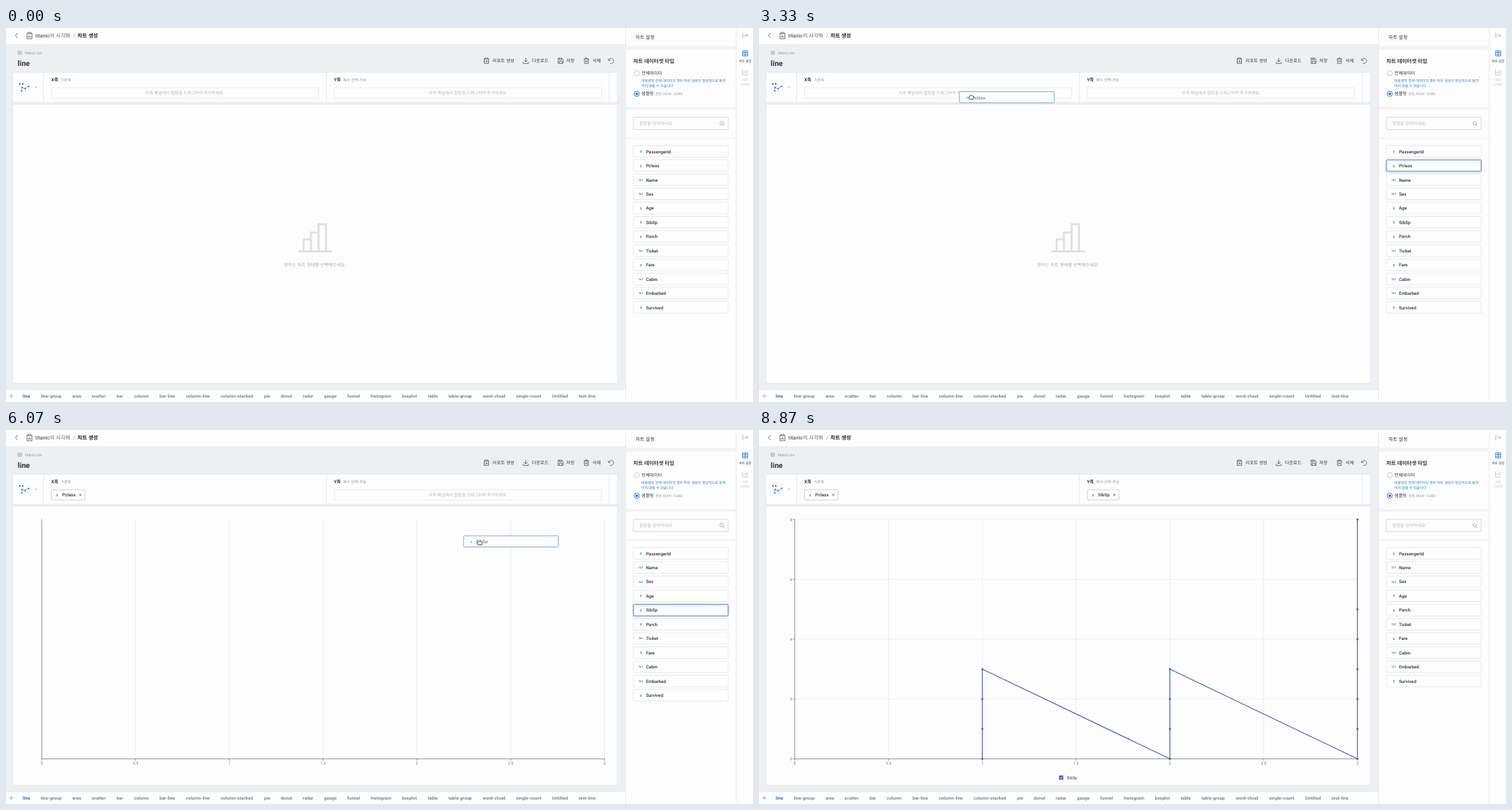
Animation, 1024 px wide and 513 px high, one loop 9.91 s. Source, as an HTML page:

```html
<!DOCTYPE html>
<html lang="ko">
<head>
<meta charset="utf-8">
<title>차트 생성</title>
<style>
html, body { margin: 0; width: 100%; height: 100%; overflow: hidden; background: #fdfdfe; }
svg { display: block; width: 100%; height: 100%; }
text {
  font: 400 6.14px Roboto, "Noto Sans CJK KR", "Noto Sans CJK", sans-serif;
  fill: #333538; text-rendering: geometricPrecision; white-space: pre;
}
.mid { text-anchor: middle; }
.end { text-anchor: end; }
.b { font-weight: 700; }
.m { font-weight: 500; }
.s4 { font-size: 4.35px; }
.s48 { font-size: 4.85px; }
.s5 { font-size: 5.12px; }
.s7 { font-size: 7.15px; }
.hint { font-size: 5.77px; fill: #b4b7bc; }
.grey { fill: #8f9399; }
.pale { fill: #b9bcc1; }
.blue { fill: #1b78d0; }
.tab { font-weight: 700; fill: #85898f; }
.tab.on { fill: #1b78d0; }
.ico { fill: none; stroke: #55585d; stroke-width: .8; }
.box { fill: #fdfdfe; stroke: #e3e5e8; stroke-width: .8; }
.rule { stroke: #e6e8eb; stroke-width: .9; }
.hot { fill: none; stroke: #4a92d6; stroke-width: 1; filter: drop-shadow(0 1.5px 1.5px #0003); }
.grid { stroke: #e2e7ec; stroke-width: .7; fill: none; }
.axis { stroke: #73767d; stroke-width: .8; fill: none; }
.tick { font-size: 5.12px; fill: #6e7079; }
.line { fill: none; stroke: #4a69b8; stroke-width: 1.15; stroke-linejoin: bevel; }
.dot { fill: #4a69b8; transform-box: fill-box; transform-origin: center; }
.skin { fill: #fff; stroke: #222; stroke-width: .8; stroke-linejoin: round; }

/* loop: 9910 ms, 1% = 99.1 ms */
.step { animation: 9.91s step-end infinite; }
.before-x { animation-name: before-x; }
.after-x { animation-name: after-x; }
.before-y { animation-name: before-y; }
.after-y { animation-name: after-y; }
.before-plot { animation-name: before-plot; }
.after-plot { animation-name: after-plot; }
.result { animation-name: result; }
.rows { animation-name: rows; }
.drag-x { animation-name: drag-x; }
.drag-y { animation-name: drag-y; }
.arrow { animation-name: arrow; }
.fist { animation-name: fist; }
.up1 { animation-name: up1; }
.up2 { animation-name: up2; }
.hover { animation-name: hover; }
.pointer { animation: pointer 9.91s linear infinite; }
.reveal { width: 0; animation: reveal 9.91s linear infinite; }
.dot { animation: pop 9.91s ease-out infinite; animation-delay: calc(var(--col) * .3333s); animation-fill-mode: backwards; }

@keyframes before-x { 37.63%, to { visibility: hidden; } }
@keyframes after-x { from { visibility: hidden; } 37.63%, to { visibility: visible; } }
@keyframes before-y { 65.88%, to { visibility: hidden; } }
@keyframes after-y { from { visibility: hidden; } 65.88%, to { visibility: visible; } }
@keyframes before-plot { 42.68%, to { visibility: hidden; } }
@keyframes after-plot { from { visibility: hidden; } 42.68%, to { visibility: visible; } }
@keyframes result { from { visibility: hidden; } 70.93%, to { visibility: visible; } }
@keyframes rows { from { visibility: hidden; } 74.36%, to { visibility: visible; } }
@keyframes drag-x { from, 37.63%, to { visibility: hidden; } 27.54% { visibility: visible; } }
@keyframes drag-y { from, 65.88%, to { visibility: hidden; } 55.79% { visibility: visible; } }
@keyframes arrow {
  from, 37.63%, 65.88% { visibility: visible; }
  27.54%, 55.79%, 84.05%, to { visibility: hidden; }
}
@keyframes fist {
  from, 37.63%, 65.88%, to { visibility: hidden; }
  27.54%, 55.79% { visibility: visible; }
}
@keyframes up1 { 37.63%, to { transform: translateY(-19.456px); } }
@keyframes up2 { 37.63% { transform: translateY(-19.456px); } 65.88%, to { transform: translateY(-38.912px); } }
@keyframes hover {
  from, 37.63%, 65.88%, to { transform: translateY(0); visibility: hidden; }
  10.49% { transform: translateY(214.02px); visibility: visible; }
  11.8% { transform: translateY(194.56px); visibility: visible; }
  12.73% { transform: translateY(175.1px); visibility: visible; }
  13.63% { transform: translateY(155.65px); visibility: visible; }
  14.53% { transform: translateY(136.19px); visibility: visible; }
  15.43% { transform: translateY(116.74px); visibility: visible; }
  16.33% { transform: translateY(97.28px); visibility: visible; }
  17.2% { transform: translateY(77.82px); visibility: visible; }
  18.31% { transform: translateY(58.37px); visibility: visible; }
  19.46% { transform: translateY(38.91px); visibility: visible; }
  21.03% { transform: translateY(58.37px); visibility: visible; }
  22.06% { transform: translateY(38.91px); visibility: visible; }
  24.08% { transform: translateY(19.456px); visibility: visible; }
  48.33% { transform: translateY(116.74px); visibility: visible; }
  50.38% { transform: translateY(97.28px); visibility: visible; }
  52.93% { transform: translateY(77.82px); visibility: visible; }
}
@keyframes pointer {
  from, 1.71% { transform: translate(940px, 520px); }
  11.8% { transform: translate(897px, 373px); }
  17.45% { transform: translate(888px, 250.5px); }
  19.67% { transform: translate(885px, 213px); }
  21.49% { transform: translate(884px, 222px); }
  24.92% { transform: translate(876px, 189px); }
  27.54% { transform: translate(876px, 189px); animation-timing-function: cubic-bezier(.4, 0, .6, .95); }
  33.6% { transform: translate(291px, 95px); animation-timing-function: ease-out; }
  36.63%, 39.05% { transform: translate(257.5px, 91px); animation-timing-function: cubic-bezier(.4, 0, .6, .95); }
  47.42% { transform: translate(846px, 285px); }
  48.94% { transform: translate(872px, 286px); }
  53.78% { transform: translate(882px, 249px); }
  55.79% { transform: translate(882px, 249px); animation-timing-function: ease-in-out; }
  65.58%, 74.36% { transform: translate(494.5px, 92.5px); animation-timing-function: ease-in; }
  84.05%, to { transform: translate(640px, -16px); }
}
@keyframes reveal { from, 70.93% { width: 0; } 81.03%, to { width: 774px; } }
@keyframes pop { from, 70.99% { transform: scale(0); } 74.02%, to { transform: scale(1); } }
</style>
</head>
<body>
<svg viewBox="0 0 1024 513" preserveAspectRatio="none">
  <defs>
    <clipPath id="wipe"><rect class="reveal" x="48" y="118" height="340"/></clipPath>
  </defs>

  <!-- page -->
  <rect width="1024" height="513" fill="#fdfdfe"/>
  <rect y="23" width="849" height="473" fill="#edf0f2"/>
  <path class="rule" d="M0 23H849M0 496H849"/>
  <path class="ico" stroke="#8f9399" d="M16 7L13 10.3L16 13.6"/>
  <path class="ico" d="M30.5 7H28.8V14.8H35.6V7H33.9M30.5 6H33.9V8H30.5ZM30.7 11V13M32.2 10V13M33.7 11.5V13"/>
  <text class="s7 m" x="40" y="13" style="fill:#5d6066">titanic의 시각화</text>
  <text class="s7 grey" x="92" y="13">/</text>
  <text class="s7 b" x="98" y="13" style="fill:#222">차트 생성</text>
  <path class="ico" stroke-width=".5" d="M16.5 31.5H21.3V36.3H16.5ZM16.5 33.2H21.3M16.5 34.8H21.3M18.9 31.5V36.3" style="stroke:#999;stroke-width:.5"/>
  <text class="s5 grey" x="26" y="35.8">titanic.csv</text>
  <text class="b" x="16" y="51.7" style="font-size:10.2px">line</text>

  <!-- toolbar -->
  <path class="ico" d="M656.8 42H655.5V48.6H661.6V42H660.3M656.8 41H660.3V43H656.8ZM657 45.5V47M658.5 44.5V47M660 45V47"/>
  <path class="ico" d="M712.5 41V46.3M710 44L712.5 46.5L715 44M709 46.5V48.7H716V46.5"/>
  <path class="ico" d="M756.8 41.3H762L763.7 43V48.6H756.8ZM758.3 41.3V43.5H761.5V41.3M758.3 48.6V45.6H762.2V48.6"/>
  <path class="ico" d="M792 42.5H799.3M794.3 42.5V41.2H797V42.5M793 42.5V48.7H798.3V42.5M794.8 44.2V47M796.5 44.2V47"/>
  <path class="ico" d="M826 42V44.7H828.7M826.2 44.5A3.4 3.4 0 1 1 828 48.2"/>
  <g class="m">
    <text class="m" x="667" y="47.2">리포트 생성</text>
    <text class="m" x="721" y="47.2">다운로드</text>
    <text class="m" x="768" y="47.2">저장</text>
    <text class="m" x="804" y="47.2">삭제</text>
  </g>

  <!-- axis settings -->
  <rect class="box" x="9.2" y="60.8" width="829" height="41.2"/>
  <rect class="box" x="9.2" y="104.5" width="829" height="382.7"/>
  <path class="rule" d="M51.5 61V102M439.3 61V102M827 61V102"/>
  <g fill="#333"><rect x="18" y="76" width="2" height="1.4"/><rect x="22" y="76" width="2" height="1.4"/></g>
  <path d="M21.5 86.5L22 81.5L26 83L26.5 86M26 83L31 80" fill="none" stroke="#1b78d0" stroke-width=".8" stroke-dasharray="2 .8"/>
  <g class="blue"><rect x="20.5" y="85.7" width="2" height="1.6"/><rect x="21" y="80.7" width="2" height="1.6"/><rect x="25.5" y="82.2" width="1.6" height="1.6"/><rect x="30" y="79.2" width="2" height="1.6"/></g>
  <path d="M39.6 80.8H42.4L41 82.3Z" fill="#8fa9c4"/>
  <text class="b" x="62" y="73.3">X축</text><text class="s5 grey" x="75" y="73">기준축</text>
  <text class="b" x="449.5" y="73.3">Y축</text><text class="s5 grey" x="462" y="73" style="font-size:5.3px">복수 선택 가능</text>
  <g class="step before-x">
    <rect class="box" x="62.3" y="82" width="366" height="14"/>
    <text class="hint mid" x="245.2" y="90.9">우측 패널에서 컬럼을 드래그하여 추가하세요.</text>
  </g>
  <g class="step before-y">
    <rect class="box" x="450" y="82" width="366.5" height="14"/>
    <text class="hint mid" x="633.4" y="90.9">우측 패널에서 컬럼을 드래그하여 추가하세요.</text>
  </g>
  <g id="chips"></g>

  <!-- empty state -->
  <g class="step before-plot">
    <path d="M401 306.3H447M408 306V290H418M418 306V280.5H428.5M428.5 306V269.2H438.7V306" fill="none" stroke="#dedfe2" stroke-width="2.7"/>
    <text class="mid" x="423.5" y="327.3" style="fill:#a9acb1">원하는 차트 형태를 선택해주세요.</text>
  </g>

  <!-- chart -->
  <g class="step after-plot" id="plot"></g>
  <g class="step result">
    <g id="scaleY"></g>
    <path class="line" clip-path="url(#wipe)" d="M306.2 451V328L563.3 451V328L820.4 451V122.8"/>
    <g id="dots"></g>
    <rect x="411.2" y="473.8" width="6" height="6" rx=".8" fill="#4a69b8"/>
    <path d="M412.6 476.8L413.8 478.1L416 475.5" fill="none" stroke="#fff" stroke-width=".8"/>
    <text x="422" y="478.5" style="font-size:5.5px">SibSp</text>
  </g>

  <!-- tabs -->
  <path class="ico" style="stroke:#a5a8ad" d="M4 504.7H10.4M7.2 501.5V507.9"/>
  <g id="tabs"></g>

  <!-- side panel -->
  <path class="rule" d="M849.5 0V513M1001 0V513M850 151H1001"/>
  <rect x="850" y="24.5" width="151" height="5" fill="#f0f2f4"/>
  <rect x="850" y="108.5" width="151" height="3.2" fill="#f0f2f4"/>
  <text class="m" x="863" y="14.5" style="font-size:6.65px">차트 설정</text>
  <text class="s7 b" x="860" y="48">차트 데이터셋 타입</text>
  <circle cx="864.7" cy="62" r="3.6" fill="#fff" stroke="#b3b6bb" stroke-width=".7"/>
  <text x="871" y="64.2">전체데이터</text>
  <text class="s48 blue" x="871" y="73.9">대용량의 전체 데이터의 경우 차트 생성이 정상적으로 동작</text>
  <text class="s48 blue" x="871" y="80.9">하지 않을 수 있습니다.</text>
  <circle cx="864.7" cy="90.2" r="3.6" fill="#fff" stroke="#1b78d0" stroke-width=".9"/>
  <circle class="blue" cx="864.7" cy="90.2" r="1.8"/>
  <text x="871" y="92.4">샘플링</text>
  <text class="s48 grey" x="890" y="92">권장, ROW : 5,000</text>
  <rect class="box" x="860" y="122.3" width="130" height="17" rx="1" style="stroke:#cfd2d6"/>
  <text class="pale" x="868" y="133" style="font-size:5.97px">컬럼을 검색하세요.</text>
  <path class="ico" style="stroke:#8f9399" d="M982.6 132.4A2.3 2.3 0 1 1 982.7 132.3L984.5 134.2"/>
  <g id="list"></g>
  <rect class="hot step hover" x="860" y="161.3" width="130" height="15.8" rx="1"/>

  <!-- icon bar -->
  <path class="ico" style="stroke:#a5a8ad" d="M1010 6.5V14M1011.5 10.2H1017M1014.7 8L1017 10.2L1014.7 12.5"/>
  <path class="ico" style="stroke:#1b78d0" d="M1009.7 31.2H1016.8V38.3H1009.7ZM1009.7 33.5H1016.8M1009.7 36H1016.8M1013.2 31.2V38.3"/>
  <text class="s4 m mid" x="1013.3" y="46.6">차트 설정</text>
  <path class="ico" style="stroke:#bfc2c7" d="M1009.6 57V64.5H1017M1011 62L1013 59.5L1014.5 61.2L1017 57.5M1014.5 63L1017 60.5"/>
  <text class="s4 mid pale" x="1013.3" y="72.7">차트</text>
  <text class="s4 mid pale" x="1013.3" y="78.9">디자인</text>

  <!-- pointer and dragged item -->
  <g class="pointer">
    <g id="ghosts"></g>
    <path class="skin step arrow" d="M0 0V7.6L1.8 6L3.1 8.8L4.5 8.2L3.2 5.5H5.6Z"/>
    <path class="skin step fist" d="M-2.4 2.6L-3.7 .6Q-3.6 -.8 -2.3 -.5V-1.6Q-1.6 -2.7 -.8 -2Q0 -3 .9 -2.1Q1.9 -2.7 2.5 -1.5Q3.9 -1.6 3.7 .2L2.9 2.6Z"/>
  </g>
</svg>
<script>
const PITCH = 19.456;
const put = (id, parts) => { document.getElementById(id).innerHTML = parts.join(''); };
const text = (x, y, s, cls = '') => `<text x="${x}" y="${y}" class="${cls}">${s}</text>`;
const range = n => [...Array(n).keys()];

// type badge, label; (x, y) is the top left corner of the item
const content = (x, y, name, isText) =>
  (isText
    ? `<text class="b mid blue" x="${x + 10.2}" y="${y + 9.4}" style="font-size:3.4px">TXT</text>`
    : `<text class="b mid blue" x="${x + 10.2}" y="${y + 9.8}" style="font-size:4.4px">3</text>`) +
  text(x + 17.2, y + 10.3, name, 'm');

const columns = ['PassengerId', 'Pclass', 'Name', 'Sex', 'Age', 'SibSp', 'Parch',
  'Ticket', 'Fare', 'Cabin', 'Embarked', 'Survived'];
const textual = new Set(['Name', 'Sex', 'Ticket', 'Cabin', 'Embarked']);
const motion = i => i === 1 ? 'step before-x' : i === 5 ? 'step before-y' : i > 5 ? 'step up2' : i > 1 ? 'step up1' : '';

put('list', columns.map((name, i) => {
  const y = 161.3 + PITCH * i;
  const item = `<rect class="box" x="860" y="${y}" width="130" height="15.8" rx="1"/>` +
    content(860, y, name, textual.has(name));
  // the second picked column moves up before it disappears
  return `<g class="${motion(i)}">${i === 5 ? `<g class="step up1">${item}</g>` : item}</g>`;
}));

const tabs = { 'line': 28, 'line-group': 62, 'area': 97, 'scatter': 127, 'bar': 156, 'column': 185.5,
  'bar-line': 221, 'column-line': 263, 'column-stacked': 316.5, 'pie': 358, 'donut': 384.5,
  'radar': 414, 'gauge': 444.5, 'funnel': 476.5, 'histogram': 514, 'boxplot': 553, 'table': 585,
  'table-group': 622.5, 'word-cloud': 669, 'single-count': 716.5, 'Untitled': 759.5, 'test-line': 796.5 };
put('tabs', Object.entries(tabs).map(([name, x], i) => text(x, 506.8, name, 'tab mid' + (i ? '' : ' on'))));

const chip = (x, w, name, cls) => `<g class="step ${cls}">
  <rect class="box" x="${x}" y="82" width="${w}" height="14" rx="1" style="stroke:#c6c9ce"/>
  ${content(x - 2.4, 80.7, name)}
  <path class="ico" d="M${x + w - 8} 87.4l3 3m0 -3l-3 3"/></g>`;
put('chips', [chip(62.3, 46, 'Pclass', 'after-x'), chip(450, 43.5, 'SibSp', 'after-y')]);

const ghost = (dx, dy, name, cls) => `<g class="step ${cls}">
  <rect x="${-dx}" y="${-dy}" width="130" height="15.4" rx="1" fill="#fdfdfe" stroke="#6aa6de" stroke-width=".9"/>
  <g opacity=".6">${content(-dx, -dy, name)}</g></g>`;
put('ghosts', [ghost(16, 7.7, 'Pclass', 'drag-x'), ghost(22, 9.9, 'SibSp', 'drag-y')]);

const px = v => 49 + v * 257.13;
const py = v => 451 - v * 41.03;
put('plot', [
  ...range(6).map(i => `<path class="grid" d="M${px((i + 1) / 2)} 122.8V451"/>`),
  '<path class="axis" d="M49 122.5V451H820.8"/>',
  ...range(7).map(i => `<path class="axis" d="M${px(i / 2)} 451v2.6"/>` + text(px(i / 2), 459.3, i / 2, 'tick mid'))
]);
put('scaleY', [
  `<g class="step rows">${range(4).map(i => `<path class="grid" d="M49.5 ${py(2 * i + 2)}H820.4"/>`).join('')}</g>`,
  ...range(5).map(i => `<path class="axis" d="M46.4 ${py(2 * i)}H49"/>` + text(45.4, py(2 * i) + 1.9, 2 * i, 'tick end'))
]);
const values = [[0, 1, 2, 3], [0, 1, 2, 3], [0, 1, 2, 3, 4, 5, 8]];
put('dots', values.flatMap((list, c) => list.map(v =>
  `<circle class="dot" style="--col:${c + 1}" cx="${px(c + 1)}" cy="${py(v)}" r="1.5"/>`)));
</script>
</body>
</html>
```
